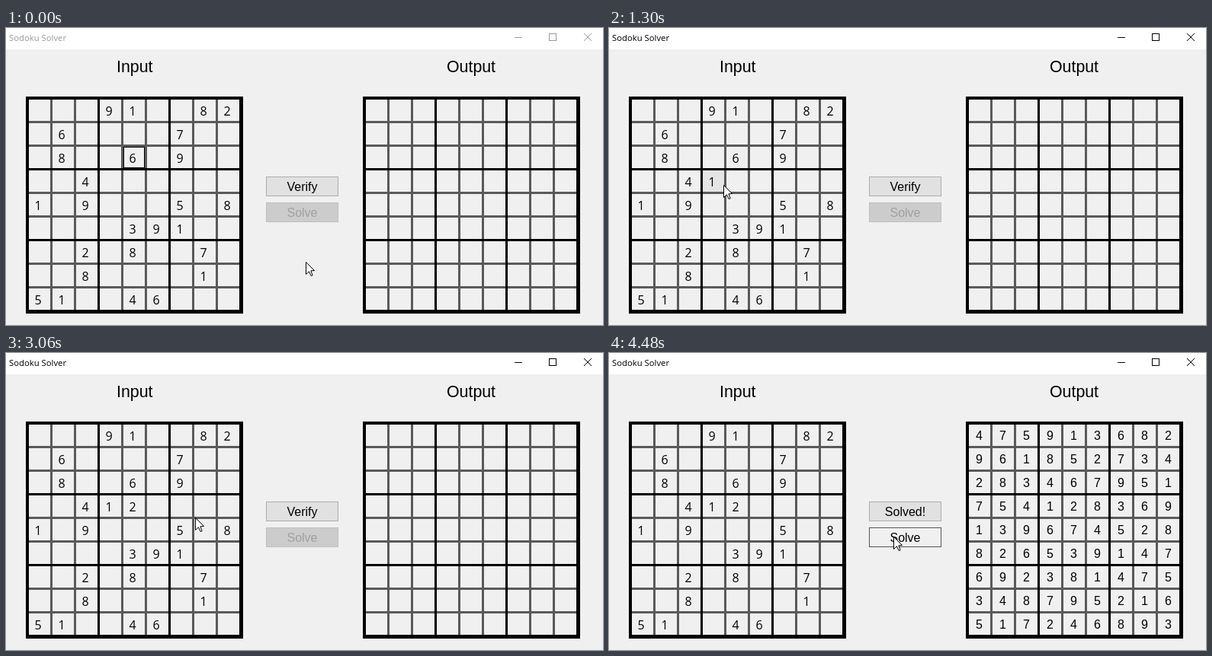
Write an HTML page with a canvas that moves like this. It is 783x390 px and loops after 5340 ms.

```html
<!DOCTYPE html>
<html lang="en">
<head>
<meta charset="utf-8">
<title>Sodoku Solver</title>
<style>
  html, body { margin: 0; width: 100%; height: 100%; overflow: hidden; background: #f0f0f0; }
  canvas { display: block; }
</style>
</head>
<body>
<canvas id="stage" width="783" height="390"></canvas>
<script>
const ctx = document.getElementById('stage').getContext('2d');
const LOOP = 5340;
const CELL = 28, LINE = 3, PITCH = CELL + LINE, EDGE = 4;
const IN_X = 26, OUT_X = 468, GRID_Y = 90, GRID_SIZE = 285;
const UI_FONT = '"Open Sans", "Noto Sans", sans-serif';
const SANS = '"Liberation Sans", Arial, sans-serif';

const GIVEN = [
  '...91..82', '.6....7..', '.8..6.9..',
  '..4......', '1.9...5.8', '....391..',
  '..2.8..7.', '..8....1.', '51..46...'
];
const SOLVED = [
  '475913682', '961852734', '283467951',
  '754128369', '139674528', '826539147',
  '692381475', '348795216', '517246893'
];

// Moments at which the state changes (ms)
const AT = { focus: 630, first: 770, second: 1910, raise: 2640, valid: 3610, solved: 4480 };

const linear = p => p;
const smooth = p => p * p * (3 - 2 * p);
const easeIn = p => p * p;
const easeOut = p => p * (2 - p);

// Pointer moves: start, step count, target x, target y, easing
const START = [393, 307];
const MOVES = [
  [70, 8, 145, 206, smooth],
  [950, 4, 142, 208, linear],
  [1230, 2, 150, 206, linear],
  [1370, 4, 163, 204, easeOut],
  [2710, 5, 196, 219, easeIn],
  [3060, 1, 248, 216, linear],
  [3130, 6, 354, 213, easeOut],
  [3940, 5, 373, 241, smooth]
];
const STEP = 70;

function pointerAt(t) {
  let [x, y] = START;
  for (const [start, steps, tx, ty, ease] of MOVES) {
    if (t < start) break;
    const p = ease(Math.min(1, (Math.floor((t - start) / STEP) + 1) / steps));
    x += (tx - x) * p;
    y += (ty - y) * p;
  }
  return [Math.round(x), Math.round(y)];
}

function fill(color, x, y, w, h) {
  ctx.fillStyle = color;
  ctx.fillRect(x, y, w, h);
}

function frame(color, x, y, w, h) {
  ctx.strokeStyle = color;
  ctx.lineWidth = 1;
  ctx.strokeRect(x + 0.5, y + 0.5, w - 1, h - 1);
}

function text(str, x, y, font, color = '#000', align = 'center') {
  ctx.font = font;
  ctx.fillStyle = color;
  ctx.textAlign = align;
  ctx.fillText(str, x, y);
}

function inside([px, py], x, y, w, h) {
  return px >= x && px < x + w && py >= y && py < y + h;
}

function titleBar(active) {
  const color = active ? '#000' : '#999';
  fill('#fff', 0, 0, 783, 28);
  text('Sodoku Solver', 4, 17, '11.3px ' + UI_FONT, color, 'left');
  fill(color, 667, 12, 10, 1);
  frame(color, 712, 7, 10, 10);
  ctx.beginPath();
  ctx.moveTo(758, 7);
  ctx.lineTo(768, 17);
  ctx.moveTo(768, 7);
  ctx.lineTo(758, 17);
  ctx.stroke();
}

function grid(x, y) {
  const bar = (d, color, w) => {
    fill(color, x + d, y, w, GRID_SIZE);
    fill(color, x, y + d, GRID_SIZE, w);
  };
  const line = (i, color) => bar(EDGE - LINE + PITCH * i, color, LINE);
  for (let i = 1; i < 9; i++) if (i % 3) line(i, '#5a5a5a');
  line(3, '#000');
  line(6, '#000');
  bar(0, '#000', EDGE);
  bar(GRID_SIZE - EDGE - 1, '#000', EDGE + 1);
}

function digits(rows, x, y, font) {
  rows.forEach((row, r) => [...row].forEach((d, c) => {
    if (d !== '.') text(d, x + PITCH * c, y + PITCH * r, font);
  }));
}

function hoverCell(tip) {
  for (let r = 0; r < 9; r++) {
    for (let c = 0; c < 9; c++) {
      const x = IN_X + EDGE + PITCH * c, y = GRID_Y + EDGE + PITCH * r;
      if (inside(tip, x, y, CELL, CELL)) fill('#e5e5e5', x, y, CELL, CELL);
    }
  }
}

function button(label, y, enabled, tip) {
  const hot = enabled && inside(tip, 341, y, 95, 26);
  const look = !enabled ? ['#ccc', '#bfbfbf', '#a0a0a0']
    : hot ? ['#f0f0f0', '#555', '#000'] : ['#e1e1e1', '#adadad', '#000'];
  fill(look[0], 341, y, 95, 26);
  frame(look[1], 341, y, 95, 26);
  text(label, 388.5, y + 19, '16px ' + SANS, look[2]);
}

const ARROW = [[0, 0], [0, 16], [4, 12.3], [6.6, 18], [8.6, 17.3], [6.4, 11.3], [11, 11]];

function arrow([x, y]) {
  ctx.beginPath();
  for (const [dx, dy] of ARROW) ctx.lineTo(x + dx + 0.5, y + dy + 0.5);
  ctx.closePath();
  ctx.fillStyle = '#fff';
  ctx.fill();
  ctx.strokeStyle = '#000';
  ctx.lineWidth = 1;
  ctx.stroke();
}

function draw(t) {
  const tip = pointerAt(t);
  const rows = GIVEN.slice();
  const a = t >= AT.first ? '1' : '.';
  const b = t >= AT.raise ? '2' : t >= AT.second ? '1' : '.';
  rows[3] = '..4' + a + b + '....';

  fill('#f0f0f0', 0, 0, 783, 390);
  titleBar(t >= AT.focus);
  text('Input', 145, 58, '21.33px ' + SANS, '#000', 'left');
  text('Output', 578, 58, '21.33px ' + SANS, '#000', 'left');

  hoverCell(tip);
  grid(IN_X, GRID_Y);
  grid(OUT_X, GRID_Y);
  if (t < AT.focus) frame('#000', 154, 156, CELL, CELL);
  digits(rows, 42, 115, '16px ' + UI_FONT);
  if (t >= AT.solved) digits(SOLVED, 485.5, 114, '16px ' + SANS);

  const status = t >= AT.solved ? 'Solved!' : t >= AT.valid ? 'Valid!' : 'Verify';
  button(status, 195, true, tip);
  button('Solve', 229, t >= AT.valid, tip);
  arrow(tip);
}

const begin = performance.now();
function tick() {
  draw((performance.now() - begin) % LOOP);
  requestAnimationFrame(tick);
}
tick();
</script>
</body>
</html>
```
